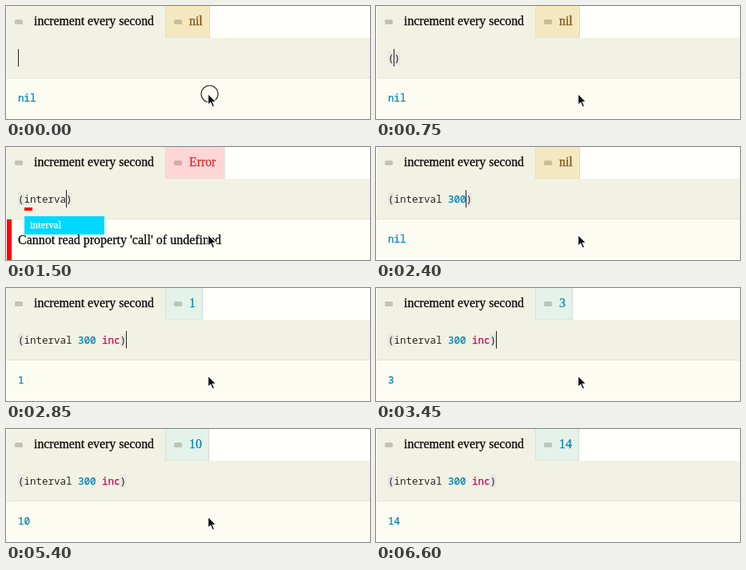
An HTML page for the animation above (6700 ms loop, 455x142 px).

```html
<!DOCTYPE html>
<html lang="en">
<head>
<meta charset="utf-8">
<title>Live evaluation</title>
<style>
html, body { margin: 0; width: 100%; height: 100%; overflow: hidden; background: #fffffc; }
svg { display: block; width: 100vw; height: 100vh; }
text { white-space: pre; stroke-width: .3px; }
.serif { font: 15.8px "Liberation Serif", serif; }
.mono { font: 12.5px "Noto Sans Mono", monospace; }
.small { font: 12.8px "Liberation Serif", serif; }
.ink { fill: #0a0a0a; stroke: #0a0a0a; }
.value { fill: #0787b4; stroke: #0787b4; }
.core { fill: #c4105c; stroke: #c4105c; }
.plain { fill: #222; }
</style>
</head>
<body>
<svg viewBox="0 0 455 142">
  <rect width="455" height="142" fill="#fffffc"/>
  <rect x="1" width="199" height="41" fill="#f2f2e4"/>
  <g id="tab">
    <rect id="tabShade" x="200" width="55" height="40.5" fill="#d9d9cc"/>
    <rect id="tabFill" x="200" width="54" height="39.5"/>
    <rect x="199" width="1" height="40" fill="#dfe0d0"/>
  </g>
  <rect x="1" y="40" width="454" height="51" fill="#f2f2e4"/>
  <rect x="1" y="90" width="454" height="1" fill="#e3e3d6"/>
  <rect x="1" y="91" width="454" height="49" fill="#fcfcf2"/>
  <rect x="11" y="17" width="10" height="6" rx="1.5" fill="#c2c2b7"/>
  <rect id="tabIcon" x="210" y="17" width="10" height="6" rx="1.5"/>
  <text class="serif ink" x="35" y="24">increment every second</text>
  <text class="serif" id="tabText" x="229" y="24"></text>

  <g fill="#e6e7e1">
    <rect id="openMark" x="15" y="57" width="7.5" height="17" rx="1"/>
    <rect id="closeMark" y="57" width="7.5" height="17" rx="1"/>
  </g>
  <text class="mono" id="code" x="15" y="70"></text>
  <rect id="underline" x="23" y="76" width="10" height="4" fill="#f00"/>
  <rect id="caret" y="54" width="1" height="22" fill="#222"/>

  <text class="mono value" id="output" x="15" y="120"></text>
  <g id="failure">
    <rect x="1" y="91" width="454" height="51" fill="#fffff8"/>
    <rect x="1" y="91" width="6" height="51" fill="#f00"/>
    <text class="serif ink" x="15" y="122" style="font-size:16px">Cannot read property 'call' of undefined</text>
  </g>
  <g id="popup"></g>

  <circle id="ring" cx="254.5" cy="110.5" r="10.5" fill="none" stroke="#222" stroke-width="1.1"/>
  <path id="pointer" d="M0 0V14.5L3.3 11.5 5.6 17 8.2 15.9 5.9 10.6H10.3Z" fill="#111" stroke="#fff" stroke-width="1.2"/>
</svg>
<script>
const LOOP = 6700, CHAR = 7.5;
const $ = id => document.getElementById(id);
const show = (id, on) => $(id).setAttribute('visibility', on ? 'visible' : 'hidden');
const attrs = (id, map) => Object.entries(map).forEach(([k, v]) => $(id).setAttribute(k, v));

const LOOKS = {
  nil: { fill: '#f4e8c1', text: '#7d5510', icon: '#c9bd98', width: 55 },
  Error: { fill: '#ffd6d6', text: '#cf3434', icon: '#cfaaa6', width: 73.5 },
  number: { fill: '#e4f2ea', text: '#0787b4', icon: '#b7c5bc', width: 46 }
};

// [time, code, result, completions]
const EDITS = [
  [0, '', 'nil'],
  [750, '()', 'nil'],
  [900, '(in)', 'Error', ['inc', 'int', 'ints']],
  [1050, '(int)', '0', ['int', 'ints', 'into']],
  [1200, '(inter)', 'Error', ['interval']],
  [1500, '(interva)', 'Error', ['interval']],
  [1650, '(interval)', 'nil', ['interval']],
  [1800, '(interval )', 'nil'],
  [2100, '(interval 3)', 'nil'],
  [2250, '(interval 30)', 'nil'],
  [2400, '(interval 300)', 'nil'],
  [2550, '(interval 300 in)', 'nil', ['inc', 'int', 'ints']],
  [2700, '(interval 300 inc)', '0', ['inc']],
  [2850, '(interval 300 inc)', '1']
];
const BLINKS = [300, 750, 3000, 3450, 4050, 4650, 5100, 5700, 6150];

const colorize = code => code.replace(/[a-z]+|\d+|[() ]+/g, word => {
  const kind = /\d/.test(word) ? 'value' : /^(int|inc)$/.test(word) ? 'core' : 'plain';
  return `<tspan class="${kind}">${word}</tspan>`;
});

const popupRow = (word, i) => {
  const y = 87 + 24 * i;
  const ink = i ? '#222' : '#fff';
  return `<rect x="23" y="${y}" width="100" height="${i ? 24 : 23}" fill="${i ? '#fffffa' : '#00d8ff'}"/>` +
    (i ? `<rect x="23" y="${y + 23}" width="100" height="1" fill="#e9e9e2"/>` : '') +
    `<text class="small" x="30" y="${y + 15}" fill="${ink}" stroke="${ink}">${word}</text>`;
};

function draw(t) {
  let [start, code, result, words = []] = EDITS.findLast(e => e[0] <= t);
  if (t >= 3000) result = String(Math.floor((t - 2400) / 300));
  const failed = result === 'Error';
  const look = LOOKS[result] || LOOKS.number;
  const width = look.width + (result.length === 2 ? 8 : 0);

  attrs('tabShade', { width });
  attrs('tabFill', { width: width - 1, fill: look.fill });
  attrs('tabIcon', { fill: look.icon });
  attrs('tabText', { fill: look.text, stroke: look.text });
  $('tabText').textContent = result;
  $('output').textContent = failed ? '' : result;
  show('failure', failed);
  show('underline', failed);

  $('code').innerHTML = colorize(code);
  show('openMark', code);
  show('closeMark', code);
  const end = Math.max(0, code.length - 1);
  attrs('closeMark', { x: 15 + end * CHAR });
  const caretAt = start === 2850 ? code.length : end;
  attrs('caret', { x: Math.round(15 + caretAt * CHAR - 0.1) });
  show('caret', BLINKS.filter(b => b <= t).length % 2 === 0);
  $('popup').innerHTML = words.map(popupRow).join('');

  show('ring', t < 150);
  show('pointer', t < 6600);
  attrs('pointer', { transform: t < 6450 ? 'translate(252.5 110)' : 'translate(302 114)' });
}

const origin = performance.now();
let shown = -1;
function tick() {
  const t = (performance.now() - origin) % LOOP;
  const step = Math.floor(t / 150);
  if (step !== shown) draw(step * 150);
  shown = step;
  requestAnimationFrame(tick);
}
tick();
</script>
</body>
</html>
```
